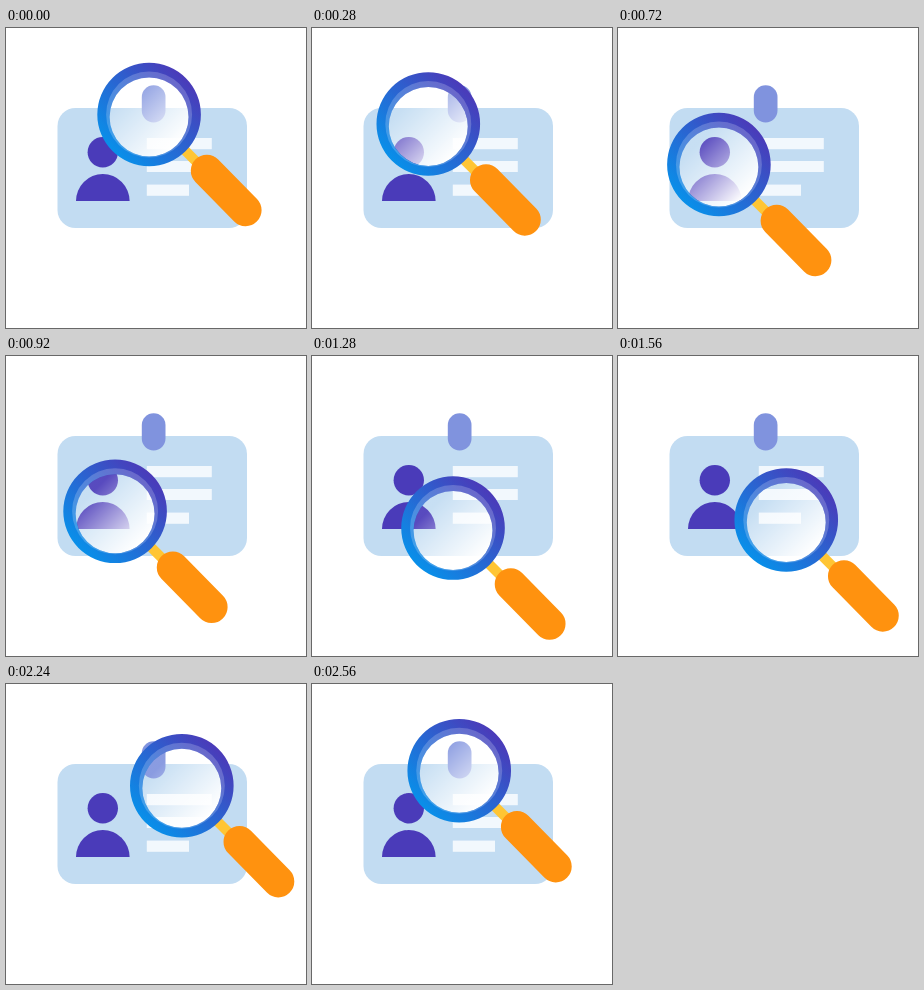
Animation, 300 px wide and 300 px high, one loop 2.6 s. Source, as an HTML page:

```html
<!DOCTYPE html>
<html lang="en">
<head>
<meta charset="utf-8">
<title>Searching profile</title>
<style>
  html, body { margin: 0; height: 100%; overflow: hidden; background: #fff; }
  svg { display: block; width: 100vw; height: 100vh; }
</style>
</head>
<body>
<svg viewBox="0 0 300 300">
  <defs>
    <linearGradient id="rim" gradientUnits="userSpaceOnUse" x1="36" y1="-36" x2="-36" y2="36">
      <stop stop-color="#4a3bb9"/>
      <stop offset="1" stop-color="#098fe9"/>
    </linearGradient>
    <linearGradient id="shine" x1="0" y1="0" x2="1" y2="1">
      <stop offset=".22" stop-color="#fff" stop-opacity=".08"/>
      <stop offset=".85" stop-color="#fff"/>
    </linearGradient>
  </defs>

  <rect x="51.5" y="80" width="189.5" height="120" rx="18" fill="#c2dcf2"/>
  <g fill="#4a3bb9">
    <circle cx="96.8" cy="124.2" r="15.2"/>
    <path d="M70 173a26.8 27 0 0 1 53.6 0z"/>
  </g>
  <g fill="#f2f8fd">
    <rect x="140.8" y="110" width="65" height="11.2"/>
    <rect x="140.8" y="133" width="65" height="11"/>
    <rect x="140.8" y="156.6" width="42.2" height="11.2"/>
  </g>
  <rect x="135.8" y="57.2" width="23.7" height="37.2" rx="11.8" fill="#8093de"/>

  <g id="magnifier">
    <path d="M34 34L56 56" stroke="#ffc534" stroke-width="10"/>
    <path d="M57.7 56.2L96.5 95.7" stroke="#ff920f" stroke-width="32" stroke-linecap="round"/>
    <circle cy="2.5" r="39.5" fill="url(#shine)"/>
    <path fill="url(#rim)" fill-rule="evenodd"
      d="M-51.8 0a51.8 51.8 0 0 1 103.6 0a51.8 51.8 0 0 1-103.6 0zM-39.5 2.5a39.5 39.5 0 0 1 79 0a39.5 39.5 0 0 1-79 0z"/>
    <path fill="#fff" fill-opacity=".2" fill-rule="evenodd"
      d="M-43 0a43 43 0 0 1 86 0a43 43 0 0 1-86 0zM-39.5 2.5a39.5 39.5 0 0 1 79 0a39.5 39.5 0 0 1-79 0z"/>
  </g>
</svg>
<script>
  const LOOP = 2600, STEP = 40, RADIUS = 42.8;
  const magnifier = document.getElementById('magnifier');

  function draw() {
    const time = Math.floor(performance.now() % LOOP / STEP) * STEP;
    const angle = time / LOOP * 2 * Math.PI;
    const x = 143.1 - RADIUS * Math.sin(angle);
    const y = 129.3 - RADIUS * Math.cos(angle);
    magnifier.setAttribute('transform', `translate(${x} ${y})`);
    requestAnimationFrame(draw);
  }
  draw();
</script>
</body>
</html>
```
